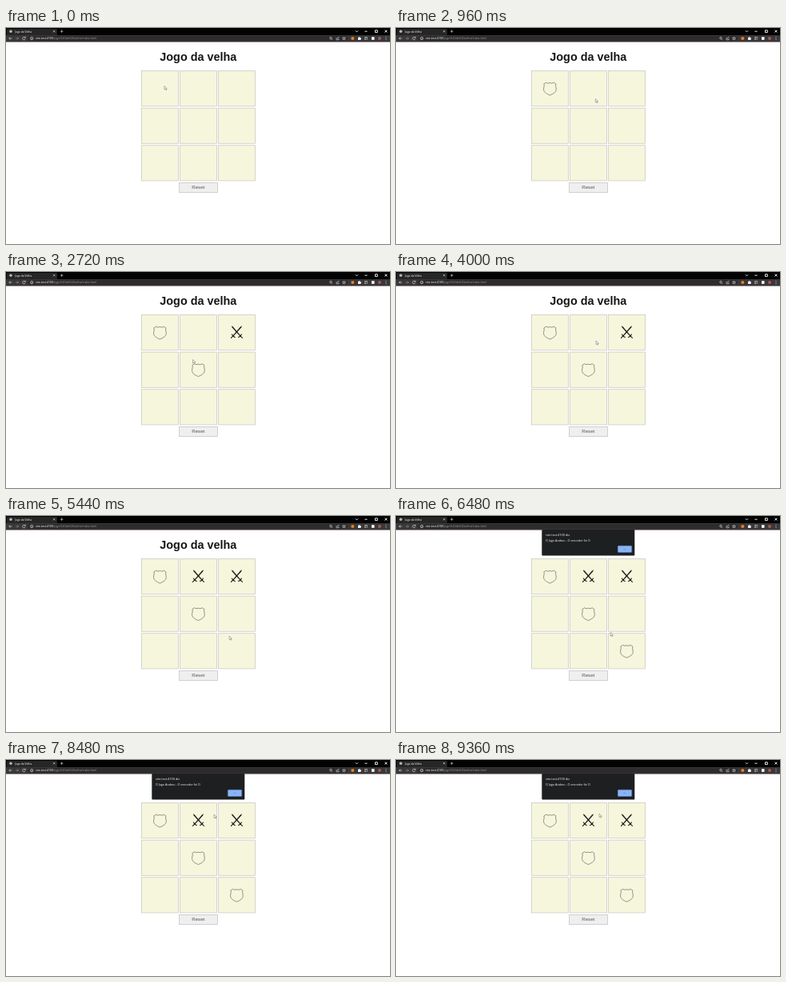
An HTML page for the animation above (9.44 s loop, 480 by 270 pixels).

```html
<!DOCTYPE html>
<html lang="pt">
<head>
<meta charset="utf-8">
<title>Jogo da velha</title>
<style>
html, body { margin: 0; width: 100%; height: 100%; overflow: hidden; background: #fff; }
svg { display: block; width: 480px; height: 270px; }
text { font-family: "Liberation Sans", Arial, sans-serif; }
.ui text { font-family: "Open Sans", sans-serif; }
.line { fill: none; stroke: #d0d0d0; stroke-width: .7; }
.window { stroke: #fff; stroke-width: .9; }
</style>
</head>
<body>
<svg viewBox="0 0 480 270">
  <defs>
    <path id="shield" fill="none" stroke="#707070" stroke-width=".75" stroke-linejoin="round"
      d="M0-6.8Q-2.5-5.6-4.9-7.2L-7.5-5.5Q-6.7-3.5-7.7-.6C-8.9 4.6-4.2 6.8 0 8.6C4.2 6.8 8.9 4.6 7.7-.6Q6.7-3.5 7.5-5.5L4.9-7.2Q2.5-5.6 0-6.8Z"/>
    <g id="sword">
      <path fill="#171717" d="M-6.6-8.2L-5.7-6L4 4.8L4.9 4L-4.6-6.9Z"/>
      <path fill="none" stroke="#171717" stroke-width="1.1" stroke-linecap="round" d="M2.2 6.2Q4.8 5.2 6 2.6M4.5 4.5L7 7"/>
    </g>
    <g id="swords"><use href="#sword"/><use href="#sword" transform="scale(-1 1)"/></g>
  </defs>

  <rect width="480" height="270" fill="#fff"/>

  <g class="ui">
    <rect width="480" height="17" fill="#030303"/>
    <path d="M1 9V2Q1 1 2 1H63Q64 1 64 2V9Z" fill="#262626"/>
    <rect y="9" width="480" height="8" fill="#383838"/>
    <rect x="27" y="10" width="400" height="6" rx="3" fill="#2c2c2c"/>
    <rect y="16.7" width="480" height=".8" fill="#3d2634"/>
    <circle cx="6" cy="4.2" r="1.7" fill="#bbb"/>
    <text x="11.3" y="5.5" font-size="3.3" fill="#fff">Jogo da Velha</text>
    <path class="line" d="M59 3l2.4 2.4m0-2.4L59 5.4M68 4.2h3.4m-1.7-1.7v3.4"/>
    <path class="line window" d="M437 3.4l1.5 1.5 1.5-1.5M448.5 4.2h3M461.5 2.8h2.8v2.8h-2.8zM473.5 2.7l2.8 2.8m0-2.8l-2.8 2.8"/>
    <path class="line" d="M7.5 13H3.8m1.6-1.6L3.8 13l1.6 1.6"/>
    <path class="line" style="stroke:#888" d="M12 13h3.7m-1.6-1.6l1.6 1.6-1.6 1.6"/>
    <path class="line" d="M24 12a1.8 1.8 0 1 0 .1 1.8M24.3 10.9v1.4h-1.4"/>
    <circle class="line" cx="32.2" cy="13" r="1.7"/>
    <path class="line" d="M32.2 12.6v1.3"/>
    <text x="37" y="14.3" font-size="3.55" fill="#fff">site.test:4100<tspan fill="#9a9a9a">/jogo%20da%20velha/index.html</tspan></text>
    <circle class="line" cx="406" cy="12.6" r="1.3"/>
    <path class="line" d="M407 13.6l1.2 1.2M413 12v2.7h3V13m-1.7.2q0-1.8 2.1-1.8"/>
    <path class="line" d="M422.5 11l.6 1.3 1.4.1-1.1 1 .4 1.4-1.3-.8-1.3.8.4-1.4-1.1-1 1.4-.1z"/>
    <circle cx="433.3" cy="13" r="2" fill="#e98124"/>
    <path fill="#eee" d="M440 11.8h1a.7.7 0 0 1 1.4 0h1v1a.7.7 0 0 1 0 1.4v.8H440z"/>
    <path class="line" d="M448 11.6h4m-4 1.4h2.4m-2.4 1.4h2.4m1.2-2v2"/>
    <rect x="457" y="11.2" width="3.5" height="3.6" fill="#fff"/>
    <circle cx="467" cy="13" r="2" fill="#a65a55"/>
    <path stroke="#ddd" stroke-linecap="round" d="M475 11.3v0m0 1.7v0m0 1.7v0" stroke-width=".9"/>
  </g>

  <text x="240.3" y="40.6" text-anchor="middle" font-size="14.4" font-weight="700" fill="#161616">Jogo da velha</text>
  <g id="board"></g>
  <rect x="216.5" y="193.5" width="48" height="12" fill="#efefef" stroke="#c6c6c6" stroke-width=".8"/>
  <text x="240.3" y="201.2" text-anchor="middle" font-size="6.1" fill="#555">Reset</text>
  <g id="marks"></g>

  <g id="alert" class="ui">
    <rect x="182.3" y="17" width="116" height="32.6" rx="1" fill="#1e1f21"/>
    <text x="187" y="25.2" font-size="3.85" fill="#fff">site.test:4100 diz</text>
    <text x="187" y="32.4" font-size="3.6" fill="#fff">O Jogo Acabou - O vencedor foi O</text>
    <rect x="277.3" y="37.3" width="17.4" height="8.2" rx="1" fill="#8ab4f8" stroke="#557eb8" stroke-width=".6"/>
    <text x="286" y="42.3" text-anchor="middle" font-size="2.4" fill="#34465f">OK</text>
  </g>
  <path id="cursor" d="M0 0V4.5L1.1 3.5L1.9 5.2L2.7 4.8L1.9 3.2H3.3Z" fill="#fff" stroke="#666" stroke-width=".5"/>
</svg>
<script>
const LOOP = 9440, STEP = 80, ALERT_AT = 5920;
const NS = "http://www.w3.org/2000/svg";
const $ = id => document.getElementById(id);

function add(parent, tag, attrs) {
  const el = document.createElementNS(NS, tag);
  for (const key in attrs) el.setAttribute(key, attrs[key]);
  return parent.appendChild(el);
}

for (let i = 0; i < 9; i++) {
  add($("board"), "rect", {
    x: 169.5 + i % 3 * 48, y: 53.5 + Math.floor(i / 3) * 46.6,
    width: 46, height: 44.2, fill: "#f6f6dc", stroke: "#cbcbc6", "stroke-width": .8
  });
}

// [time, column, row, symbol]
const moves = [
  [400, 0, 0, "shield"], [1520, 2, 0, "swords"], [2480, 1, 1, "shield"],
  [4320, 1, 0, "swords"], [5840, 2, 2, "shield"]
].map(([at, col, row, kind]) => ({
  at,
  el: add($("marks"), "use", {
    href: "#" + kind, x: 192.4 + col * 48, y: 75.4 + row * 46.6
  })
}));

// [time, x, y]
const path = [
  [0, 198, 72.5], [480, 198, 73], [960, 249.3, 88.5], [1360, 286, 78],
  [1680, 286, 78], [2320, 235, 112], [2720, 233.5, 109.5], [3200, 235, 112],
  [4000, 250, 86], [4240, 245, 80], [4800, 246, 82], [5600, 283, 158],
  [5760, 286, 166], [6080, 286, 166], [6480, 268, 145.5], [7200, 266, 92],
  [7680, 264, 69.5], [8500, 260, 68], [9360, 254, 67], [LOOP, 254, 67]
];

function pointer(t) {
  const i = Math.max(1, path.findIndex(p => p[0] > t));
  const [t0, x0, y0] = path[i - 1], [t1, x1, y1] = path[i];
  const k = (t - t0) / (t1 - t0), e = k * k * (3 - 2 * k);
  return [x0 + (x1 - x0) * e, y0 + (y1 - y0) * e];
}

function show(el, on) { el.setAttribute("visibility", on ? "visible" : "hidden"); }

function draw(now) {
  const t = Math.floor(now % LOOP / STEP) * STEP;
  for (const move of moves) show(move.el, t >= move.at);
  show($("alert"), t >= ALERT_AT);
  $("cursor").setAttribute("transform", `translate(${pointer(t)})`);
}

const start = performance.now();
function tick() {
  draw(performance.now() - start);
  requestAnimationFrame(tick);
}
tick();
</script>
</body>
</html>
```
